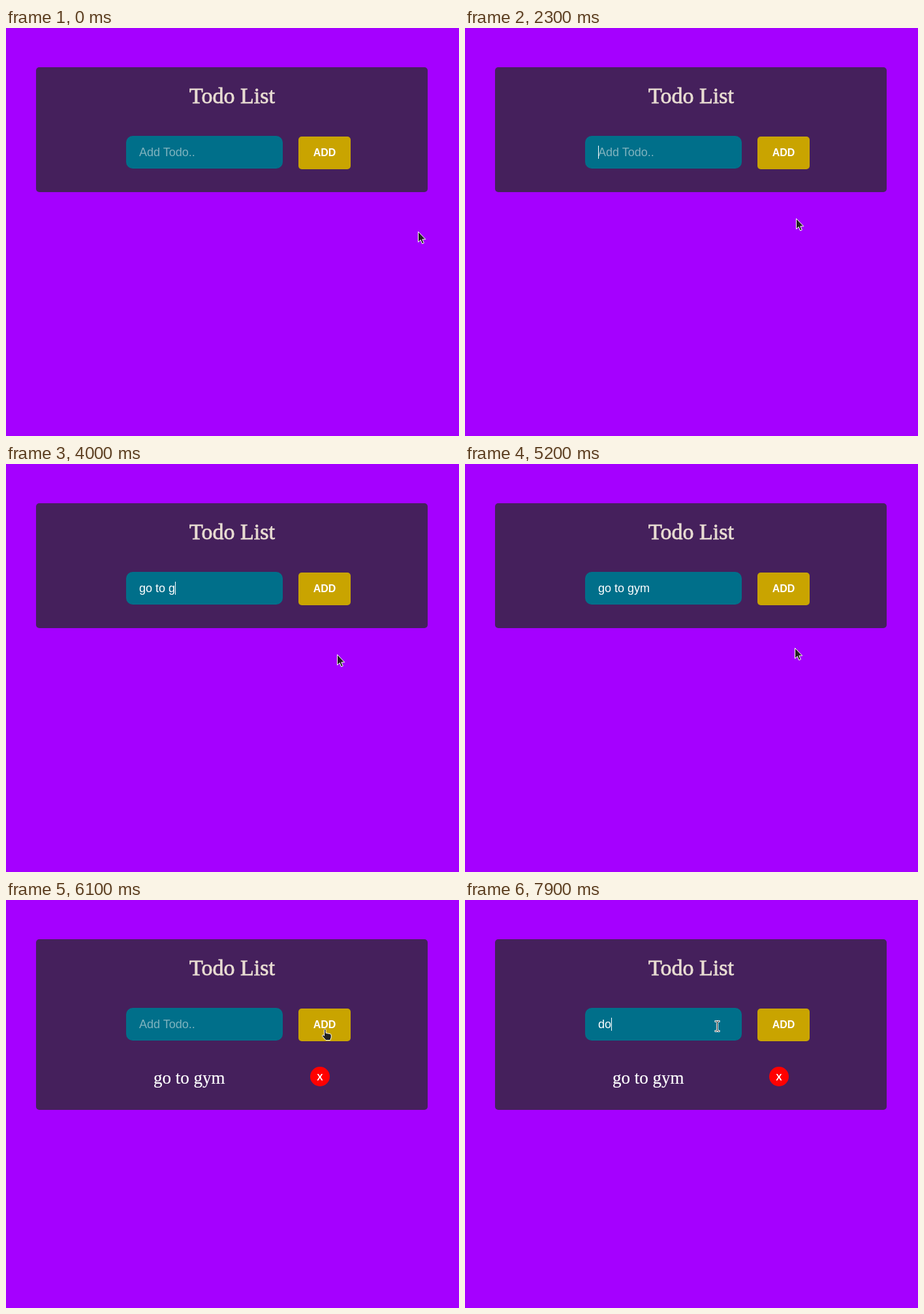
Write an HTML page that moves like this. It is 694x624 px and loops after 8 s.

```html
<!DOCTYPE html>
<html lang="en">
<head>
<meta charset="utf-8">
<title>Todo List</title>
<style>
  html, body { margin: 0; height: 100%; overflow: hidden; background: #a500ff; }
  svg { display: block; }
  text { white-space: pre; fill: #fff; }
  .serif { font-family: "Liberation Serif", serif; }
  .sans { font-family: "Liberation Sans", Arial, sans-serif; }
  .bold { font-weight: bold; text-anchor: middle; }
  .title { font-size: 34px; text-anchor: middle; fill: #e8dcd2; stroke: #e8dcd2; stroke-width: .8; }
  .item { font-size: 27px; stroke: #fff; stroke-width: .2; }
  .solid { fill: #222; stroke: #fff; stroke-linejoin: round; }
  .beam { fill: none; stroke: #fff; stroke-width: 3; stroke-linecap: square; }
  .beam + .beam { stroke: #111; stroke-width: 1; }
</style>
</head>
<body>
<svg width="694" height="624" viewBox="0 0 694 624">
  <rect id="card" x="46" y="60" width="600" height="191" rx="5" fill="#45205c"/>
  <text class="serif title" x="346.5" y="115">Todo List</text>

  <rect x="184" y="165" width="240" height="50" rx="10" fill="#006f8a"/>
  <text id="field" class="sans" x="204" y="196" font-size="18"></text>
  <rect id="caret" y="180" width="1" height="20" fill="#fff"/>

  <rect x="448" y="166" width="80" height="50" rx="5" fill="#c9a400"/>
  <text class="sans bold" x="488" y="196" font-size="16">ADD</text>

  <g id="todo">
    <text class="serif item" x="226" y="281">go to gym</text>
    <circle cx="481" cy="270" r="15" fill="#f00"/>
    <text class="sans bold" x="481" y="276" font-size="14">X</text>
  </g>

  <g id="pointer">
    <path id="arrow" class="solid" d="M.5.5V16.5L4.2 13.2 6.6 19 9.3 17.9 6.9 12.2H11.7Z"/>
    <g id="text">
      <path class="beam" d="M-2-7.5H-.5L.5-6.5 1.5-7.5H3M.5-6.5V6.5M-2 7.5H-.5L.5 6.5 1.5 7.5H3"/>
      <path class="beam" d="M-2-7.5H-.5L.5-6.5 1.5-7.5H3M.5-6.5V6.5M-2 7.5H-.5L.5 6.5 1.5 7.5H3"/>
    </g>
    <path id="hand" class="solid" d="M-.5.5C-.5-1 2-1 2 .5V5.5L8 6.5Q10.3 7 10.3 9V12L8.7 16.5H2L-3.2 10.5Q-4 8.5-2 8.3L-.5 9.8Z"/>
  </g>
</svg>
<script>
const LOOP = 8000, STEP = 100, ADDED = 6100;
const $ = id => document.getElementById(id);
const show = (id, on) => $(id).setAttribute("visibility", on ? "visible" : "hidden");

// time, x, y of the pointer's hot spot
const path = [
  [0, 631, 311], [800, 355, 202], [1000, 355, 202], [1300, 515, 291],
  [1400, 515, 291], [1500, 507, 291], [5000, 507, 291], [6000, 488, 199],
  [6100, 488, 198], [6500, 388, 193], [6600, 388, 193], [6700, 386, 193], [8000, 386, 193]
];
const typing = [
  [0, ""], [2400, "g"], [2600, "go"], [2900, "go "], [3100, "go t"], [3300, "go to"],
  [3500, "go to "], [4000, "go to g"], [4100, "go to gy"], [4500, "go to gym"],
  [ADDED, ""], [7700, "d"], [7900, "do"]
];
const caretOn = [[1100, 1700], [2300, 5100], [5600, 6000], [6800, 7400], [7700, 8000]];

function pointerAt(t) {
  const i = path.findIndex(key => key[0] > t);
  const [t0, x0, y0] = path[i - 1], [t1, x1, y1] = path[i];
  const p = (t - t0) / (t1 - t0), ease = p * p * (3 - 2 * p);
  return [Math.round(x0 + (x1 - x0) * ease), Math.round(y0 + (y1 - y0) * ease)];
}

function draw(t) {
  const value = typing.findLast(key => key[0] <= t)[1];
  const field = $("field");
  field.textContent = value || "Add Todo..";
  field.style.fill = value ? "#fff" : "#7fb3be";
  $("caret").setAttribute("x", 204 + (value ? Math.round(field.getComputedTextLength()) : 0));
  show("caret", caretOn.some(([from, to]) => t >= from && t < to));

  $("card").setAttribute("height", t < ADDED ? 191 : 261);
  show("todo", t >= ADDED);

  const [x, y] = pointerAt(t);
  const inside = (left, top, w, h) => x >= left && x < left + w && y >= top && y < top + h;
  const shape = inside(184, 165, 240, 50) ? "text" : inside(448, 166, 80, 50) ? "hand" : "arrow";
  for (const id of ["arrow", "text", "hand"]) show(id, id === shape);
  $("pointer").setAttribute("transform", `translate(${x} ${y})`);
}

const start = performance.now();
function tick() {
  const t = (performance.now() - start) % LOOP;
  draw(Math.floor(t / STEP) * STEP);
  requestAnimationFrame(tick);
}
tick();
</script>
</body>
</html>
```
